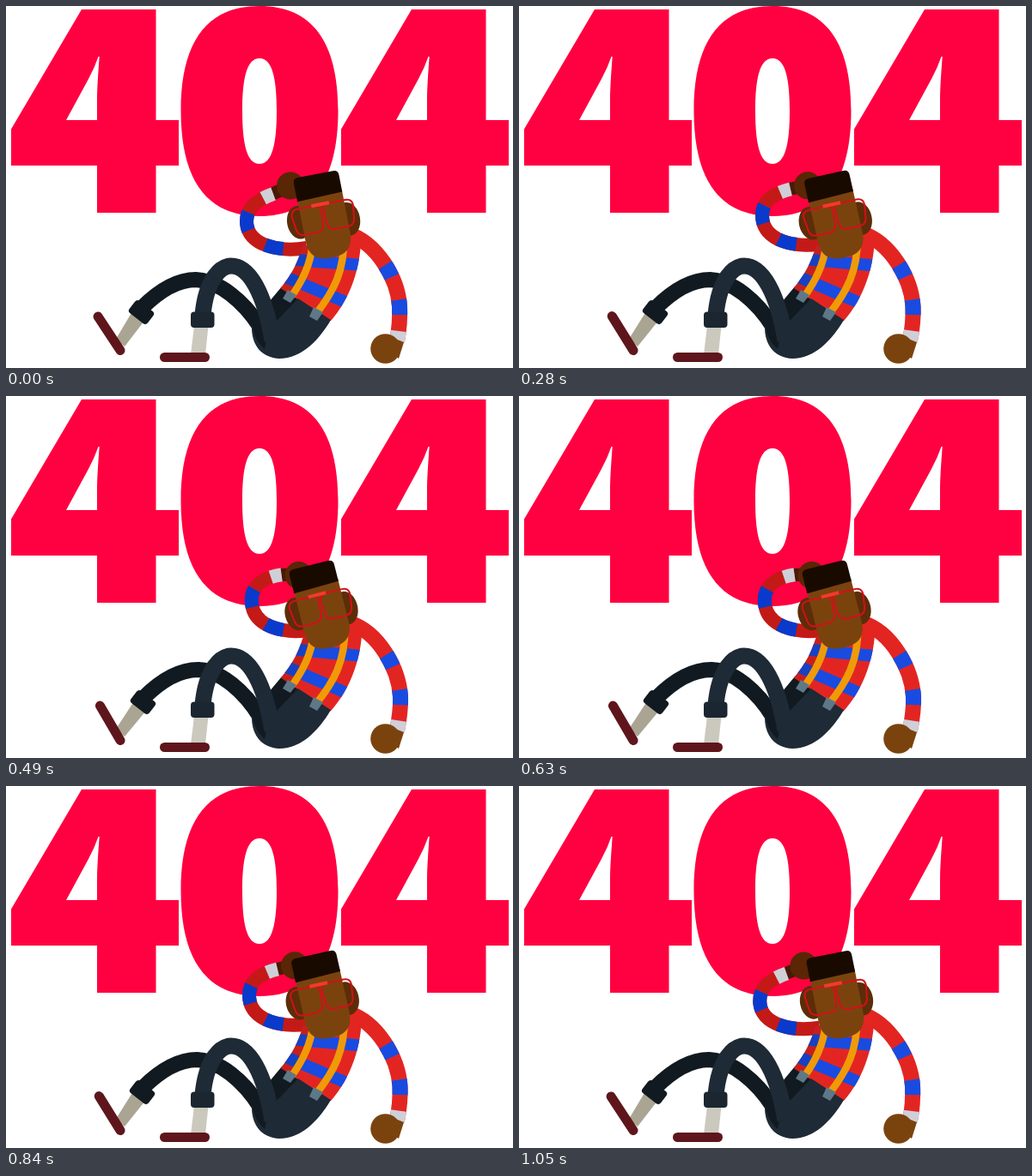
An HTML page for the animation above (1120 ms loop, 590x422 px).

```html
<!DOCTYPE html>
<html lang="en">
<head>
<meta charset="utf-8">
<title>404</title>
<style>
  html, body { margin: 0; width: 100%; height: 100%; overflow: hidden; background: #fff; }
  svg { display: block; width: 590px; height: 422px; }
  .tube { fill: none; stroke-linejoin: round; }
</style>
</head>
<body>
<svg viewBox="0 0 590 422" role="img" aria-label="404">
  <defs>
    <path id="four" d="M88 4H174.500V133H201V186H174.500V241H106V186H6V143.500ZM70 133H106V107Q106 94 108.700 59H107.500Q103 72 96 85Z"/>
    <path id="backArm" pathLength="137"
      d="M311 219C292 226 280 235 280 251C280 280 320 287 350 282"
      data-to="M321 208C298 211 286 222 286 237C286 270 325 276 350 273"/>
    <path id="frontArm" pathLength="146"
      d="M397 265C432 276 456 318 458 350C458.500 362 458 375 455 390"
      data-to="M399 264C434 275 457 318 459 350C459.500 362 458 375 455 390"/>
    <path id="shirt" d="M345 280L413 266C414 300 402 340 378 367L319.500 329C333 312 339 300 345 280Z"/>
    <clipPath id="shirtClip"><use href="#shirt"/></clipPath>
  </defs>

  <g fill="#ff0040" fill-rule="evenodd">
    <use href="#four"/>
    <use href="#four" x="384"/>
    <path d="M295 0C355 0 386.500 40 386.500 122C386.500 205 355 245 295 245C235 245 203.500 205 203.500 122C203.500 40 235 0 295 0Z
             M295 61C280 61 275 85 275 122C275 160 280 184 295 184C310 184 315 160 315 122C315 85 310 61 295 61Z"/>
  </g>

  <!-- back arm and hand -->
  <path class="tube" stroke="#471b03" stroke-width="15" d="M310 219L331 210" data-to="M320 208L341 208"/>
  <circle r="16" fill="#5a2606" transform="translate(331 209.500)" data-to="translate(341 209)"/>
  <g class="tube" stroke-width="16">
    <use href="#backArm" stroke="#c41a17"/>
    <use href="#backArm" stroke="#0a3acb" stroke-dasharray="0 38 22 27 22 99"/>
    <use href="#backArm" stroke="#cfcfd8" stroke-dasharray="13 200"/>
  </g>

  <!-- back leg -->
  <path fill="#aaa592" d="M147 356L161 367L138 397L128 388Z" data-to="M149 356L163 367L138 397L128 388Z"/>
  <path class="tube" stroke="#5e161c" stroke-width="11" stroke-linecap="round"
    d="M107 362L133 401.500" data-to="M109.500 361L133 401.500"/>
  <path class="tube" stroke="#111a21" stroke-width="18"
    d="M158 352C185 325 205 319 221 319C248 320 277 345 295 373"
    data-to="M160 352C187 325 208 319 224 319C250 320 278 345 295 373"/>
  <rect x="-13.500" y="-9" width="27" height="18" rx="4" fill="#111a21"
    transform="translate(157.500 357) rotate(38)" data-to="translate(159.500 357) rotate(38)"/>
  <path fill="#111a21" d="M321 327L348 345L318 380L296 364L306 345Z"/>

  <!-- front arm -->
  <g class="tube" stroke-width="18">
    <use href="#frontArm" stroke="#e32522"/>
    <use href="#frontArm" stroke="#194be0" stroke-dasharray="0 57 15.500 27 17.500 99"/>
    <use href="#frontArm" stroke="#cfcfd8" stroke-dasharray="0 135 12 99"/>
  </g>
  <g fill="#7a430e">
    <path d="M446 385L463 392L457 411L441 400Z"/>
    <circle cx="441.500" cy="399.500" r="17.300"/>
  </g>

  <!-- torso -->
  <g transform="rotate(0 349 348)" data-to="rotate(1 349 348)">
    <use href="#shirt" fill="#e32522"/>
    <g clip-path="url(#shirtClip)" class="tube">
      <path stroke="#194be0" stroke-width="14" d="M330 295Q370 299 415 302M318 313L400 347"/>
      <path fill="#000" opacity=".13" d="M357 275Q354 310 331 340H300V275Z"/>
      <path stroke="#f09a08" stroke-width="8.500" d="M356.500 280Q353 310 331 340M393 270C394 308 382 332 360 360"/>
    </g>
  </g>

  <!-- trousers and front leg -->
  <path fill="#1e2a35" d="M340 341L378 366C365 388 345 411 318 411C298 410 285 396 286 372L304 372L316 366Z"/>
  <path fill="#111a21" d="M286 362Q285 386 301 400L305 380L300 362Z"/>
  <g fill="#5f7888">
    <path d="M328 331L338 337L331 346L322 341Z"/>
    <path d="M358 351L369 357L362 367L353 362Z"/>
  </g>
  <path fill="#cbc9bd" d="M219 373H235.500L232 406H215Z"/>
  <rect x="179" y="404" width="58" height="11" rx="5.500" fill="#5e161c"/>
  <path class="tube" stroke="#1e2a35" stroke-width="19" d="M229 360C233 318 250 303 262 303C283 303 301 335 310 390"/>
  <rect x="215" y="356.500" width="27.500" height="18.500" rx="4" fill="#1b2630"/>

  <!-- head, pivoting at the chin -->
  <g transform="translate(375 290) rotate(-11)" data-to="translate(374.500 290) rotate(-14.200)">
    <g fill="#5c2d08">
      <ellipse cx="-26" cy="-43.500" rx="14" ry="19.500"/>
      <ellipse cx="31" cy="-36.500" rx="13.500" ry="19.500"/>
    </g>
    <path fill="#7a430e" d="M-23 -72H30V-21Q30 4 6 4H1Q-23 4 -23 -21Z"/>
    <path fill="#190a00" d="M-23.500 -67.500V-89Q-23.500 -95 -17.500 -95H24Q30 -95 30 -89V-69Z"/>
    <g class="tube" stroke="#d40f18" stroke-width="2">
      <path id="lens" d="M-25 -59H-6Q2 -59 2 -51L1 -36Q0 -28 -8 -28H-22Q-30 -28 -31 -36L-33 -51Q-33 -59 -25 -59Z"/>
      <use href="#lens" transform="translate(6.500 0) scale(-1 1)"/>
    </g>
    <path class="tube" stroke="#f23a2c" stroke-width="4" d="M-8.500 -59.500H12.500"/>
  </g>
</svg>
<script>
  const LOOP = 1120, STEP = 70;
  const number = /-?\d+(?:\.\d+)?/g;

  const parts = [...document.querySelectorAll('[data-to]')].map(el => {
    const name = el.hasAttribute('d') ? 'd' : 'transform';
    const from = el.getAttribute(name);
    return { el, name, from, start: from.match(number), end: el.dataset.to.match(number) };
  });

  function pose(p) {
    for (const { el, name, from, start, end } of parts) {
      let i = 0;
      el.setAttribute(name, from.replace(number, () => {
        const a = +start[i], b = +end[i++];
        return (a + (b - a) * p).toFixed(3);
      }));
    }
  }

  function frame() {
    const t = Math.floor(performance.now() % LOOP / STEP) * STEP;
    pose((1 - Math.cos(2 * Math.PI * t / LOOP)) / 2);
    requestAnimationFrame(frame);
  }
  frame();
</script>
</body>
</html>
```
